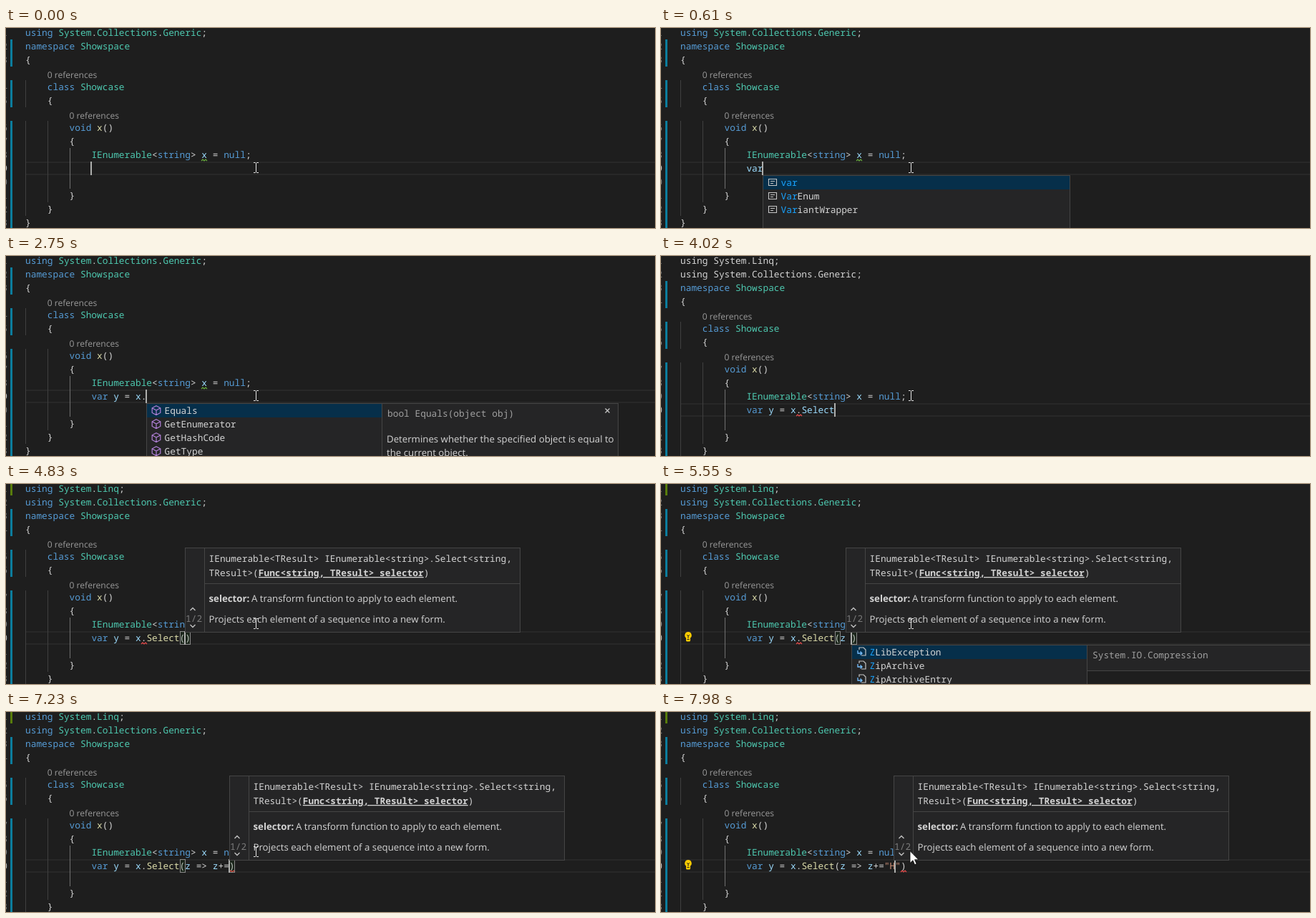
Recreate the animation shown at these times as an HTML page. Size 907 px wide and 280 px high, loop 8000 ms.

```html
<!DOCTYPE html>
<html lang="en">
<head>
<meta charset="utf-8">
<title>Code completion</title>
<style>
  html, body { margin: 0; width: 100%; height: 100%; overflow: hidden; background: #1e1e1e; }
  svg { display: block; width: 907px; height: 280px; }
  text { white-space: pre; text-rendering: geometricPrecision; fill: #d4d4d4; }
  .m { font: 12.83px "Noto Sans Mono", "DejaVu Sans Mono", monospace; }
  .s { font: 13.26px "Open Sans", "Noto Sans", sans-serif; }
  .b { font-weight: 700; }
  .lens { font-size: 12.07px; fill: #999; }
  .dim { fill: #a0a0a0; }
  .num { fill: #858585; text-anchor: end; }
  .num.on { fill: #c6c6c6; }
  .kw { fill: #569cd6; }
  .ty { fill: #4ec9b0; }
  .va { fill: #9cdcfe; }
  .fn { fill: #dcdcaa; }
  .st { fill: #ce9178; }
  .hit { fill: #18a3ff; }
  .u { text-decoration: underline; }
  .box { fill: #252526; stroke: #454545; }
  .pair { fill: #0064001a; stroke: #888; }
  .ln { fill: none; }
</style>
</head>
<body>
<svg id="stage" viewBox="0 0 907 280"></svg>
<script>
const LOOP = 8000, CH = 7.698, ROW = 19, LEFT = 27;
const KEYWORDS = /^(using|namespace|class|void|string|null|var)$/;
const TYPES = /^(System|Collections|Generic|Linq|Showspace|Showcase|IEnumerable)$/;

// Each entry: indent in columns, then text; "#" marks a reference count
const HEAD = [
  [0, 'using System.Collections.Generic;'], [0, 'namespace Showspace'], [0, '{'],
  [4, '#'], [4, 'class Showcase'], [4, '{'],
  [8, '#'], [8, 'void x()'], [8, '{'],
  [12, 'IEnumerable<string> x = null;']
];
const FOOT = [[0, ''], [8, '}'], [4, '}'], [0, '}']];

const LISTS = {
  v: { rows: ['var', 'virtual', 'void', 'volatile'], hit: 1, icon: 'key' },
  va: { rows: ['var', 'ValueTask', 'ValueTuple', 'ValueType'], hit: 2, icon: 'key' },
  var: { rows: ['var', 'VarEnum', 'VariantWrapper'], hit: 3, icon: 'key' },
  x: { rows: ['x', 'XAttribute', 'XCData', 'XComment'], hit: 1, icon: 'ref', type: '(local variable) IEnumerable<string> x' },
  dot: {
    rows: ['Equals', 'GetEnumerator', 'GetHashCode', 'GetType'], hit: 0, icon: 'cube',
    type: 'bool Equals(object obj)',
    docs: ['Determines whether the specified object is equal to', 'the current object.']
  },
  s: { rows: ['Select', 'SelectMany', 'SequenceEqual', 'Single'], hit: 1, icon: 'cube', type: 'System.Linq' },
  se: { rows: ['Select', 'SelectMany', 'SequenceEqual'], hit: 2, icon: 'cube', type: 'System.Linq' },
  z: { rows: ['ZLibException', 'ZipArchive', 'ZipArchiveEntry'], hit: 1, icon: 'ref', type: 'System.IO.Compression' }
};

const CALL = 'var y = x.Select(';
const START = { code: '', tail: '', caret: 1, bulb: 0, list: '', at: 0, sig: 0, added: 0, plain: 0, bar: 0, warn: 1, dotErr: 0, endErr: 0, arrow: 0 };
const STEPS = [
  [260, { code: 'v' }], [300, { list: 'v', at: 1 }],
  [400, { code: 'va' }], [430, { list: 'va', at: 2 }],
  [530, { code: 'var' }], [560, { list: 'var', at: 3 }],
  [670, { code: 'var ' }], [690, { list: '' }],
  [1180, { caret: 0 }], [1220, { caret: 1, code: 'var y' }], [1430, { bulb: 1 }],
  [1630, { code: 'var y ' }], [1750, { code: 'var y =' }], [1870, { code: 'var y = ' }],
  [2100, { bulb: 0 }],
  [2380, { code: 'var y = x' }], [2440, { list: 'x', at: 9 }],
  [2730, { code: 'var y = x.' }], [2750, { list: 'dot', at: 10 }], [2960, { bulb: 1 }],
  [3220, { caret: 0 }],
  [3490, { caret: 1, code: 'var y = x.S' }], [3510, { list: 's', at: 11 }],
  [3590, { code: 'var y = x.Se' }], [3610, { list: 'se', at: 12 }],
  [3630, { warn: 0, dotErr: 1 }], [3840, { bulb: 0 }],
  [4020, { code: 'var y = x.Select', list: '', added: 1, plain: 1 }], [4040, { plain: 0 }], [4220, { bar: 1 }],
  [4500, { code: CALL, tail: ')' }], [4600, { sig: 17 }],
  [5110, { code: CALL + 'z' }], [5130, { sig: 18 }], [5180, { list: 'z', at: 18 }],
  [5480, { bulb: 1 }], [5550, { code: CALL + 'z ', at: 19 }], [5570, { sig: 19, list: '' }],
  [5800, { code: CALL + 'z =' }], [5820, { sig: 20 }], [6050, { bulb: 0 }],
  [6170, { code: CALL + 'z =>' }], [6190, { sig: 21 }],
  [6400, { code: CALL + 'z => ' }], [6440, { sig: 22 }],
  [6720, { code: CALL + 'z => z' }], [6740, { sig: 23 }],
  [6790, { code: CALL + 'z => z+' }], [6830, { sig: 24, dotErr: 0, endErr: 1 }],
  [7130, { code: CALL + 'z => z+=' }], [7160, { sig: 25 }],
  [7590, { code: CALL + 'z => z+="', tail: '")' }], [7630, { sig: 26 }],
  [7860, { bulb: 1 }], [7960, { code: CALL + 'z => z+="H' }], [7980, { sig: 26.72, arrow: 1 }]
];

const esc = s => s.replace(/&/g, '&amp;').replace(/</g, '&lt;');
const colX = c => LEFT + c * CH;
const codeX = c => colX(12 + c);
const text = (x, y, cls, body) => `<text x="${x}" y="${y}" class="${cls}">${body}</text>`;
const rect = (x, y, w, h, attr) => `<rect x="${x}" y="${y}" width="${w}" height="${h}" ${attr}/>`;
const box = (x, y, w, h, cls = 'box') => rect(x + .5, y + .5, w - 1, h - 1, `class="${cls}"`);
const line = (d, color, w = 1) => `<path class="ln" d="${d}" stroke="${color}" stroke-width="${w}"/>`;

function paint(src) {
  return src.replace(/"[^"]*"?|\w+|[^\w"]+/g, (tok, i) => {
    let cls = '';
    if (tok[0] === '"') cls = 'st';
    else if (/\w/.test(tok)) {
      if (tok === 'var') cls = src.includes('=') ? 'kw' : 'va';
      else if (KEYWORDS.test(tok)) cls = 'kw';
      else if (TYPES.test(tok)) cls = 'ty';
      else cls = src[i + tok.length] === '(' ? 'fn' : 'va';
    }
    return `<tspan class="${cls}">${esc(tok)}</tspan>`;
  });
}

function squiggle(x, top, color) {
  return line(`M${x} ${top + 18}` + 'l2 -2l2 2'.repeat(2), color, 1.1);
}

function guide(col, from, to, color = '#404040') {
  return rect(Math.round(colX(col)), from, 1, to - from, `fill="${color}"`);
}

function bulb(top) {
  return `<g transform="translate(33 ${top + 1})">
    <path d="M5 0a4.8 4.8 0 0 1 3 8.5V12.500l-1 1H3l-1-1V8.500A4.800 4.800 0 0 1 5 0Z" fill="#fc0"/>
    <path d="M3.200 4l1.800 2 1.800-2M5 6v3M3.300 10.500h3.400" class="ln" stroke="#1e1e1e"/></g>`;
}

const ICONS = {
  cube: line('M7 .8L12.800 3.800V10.500L7 13.600 1.200 10.500V3.800ZM1.200 3.800L7 7l5.800-3.200M7 7v6.600', '#b180d7', 1.2),
  ref: line('M4 4V1h6l3 3v8H7', '#c5c5c5', 1.2) + line('M2 5v4h6M5.500 6.500L8 9 5.500 11.500', '#75beff', 1.3),
  key: line('M1.500 2.500h11v9h-11zM4 5.500h6M4 8.500h4', '#c5c5c5', 1.1)
};

function suggest(name, col, top) {
  const { rows, hit, icon, type, docs } = LISTS[name];
  const x = Math.round(codeX(col)), w = type ? 330 : 430;
  let out = box(x, top, w, 90) + rect(x + 1, top + 1, w - 2, ROW, 'fill="#062f4a"');
  rows.forEach((r, i) => {
    const y = top + 1 + i * ROW;
    out += `<g transform="translate(${x + 7} ${y + 2})">${ICONS[icon]}</g>`;
    out += text(x + 25.5, y + 14, 'm', `<tspan class="hit">${r.slice(0, hit)}</tspan>${r.slice(hit)}`);
  });
  if (!type) return out;
  const dx = x + w;
  out += box(dx - 1, top, 331, docs ? 90 : 37) + text(dx + 7, top + 19, 'm dim', esc(type));
  out += line(`M${dx + 311.500} ${top + 7.500}l6 6m0 -6l-6 6`, '#c5c5c5', 1.3);
  (docs || []).forEach((d, i) => out += text(dx + 6, top + 55 + i * ROW, 's', d));
  return out;
}

function signature(col) {
  const x = Math.round(codeX(col)), tx = x + 33.5;
  return box(x, 89, 469, 119) +
    rect(x + 27, 90, 1, 117, 'fill="#454545"') + rect(x + 28, 139, 440, 1, 'fill="#454545"') +
    line(`M${x + 7.500} 177l3.500 -3.500 3.500 3.500M${x + 7.500} 197l3.500 3.500 3.500 -3.500`, '#c5c5c5', 1.3) +
    text(x + 1, 193, 'm" style="fill:#7c7c7c', '1/2') +
    text(tx, 109, 'm', esc('IEnumerable<TResult> IEnumerable<string>.Select<string,')) +
    text(tx, 129, 'm', `TResult>(<tspan class="b u">${esc('Func<string, TResult> selector')}</tspan>)`) +
    text(tx, 165, 's b', 'selector:') +
    text(tx + 59.5, 165, 's', 'A transform function to apply to each element.') +
    text(tx, 194, 's', 'Projects each element of a sequence into a new form.');
}

function pointer(arrow) {
  if (arrow) return '<path d="M348 194.500v17l4-3.700 2.600 6 2.600-1.200-2.600-5.800h5.400Z" fill="#fff" stroke="#000" stroke-width=".8"/>';
  return line('M346 188.500h2.500l1 1 1 -1h2.500M349.500 189v13M346 202.500h2.500l1 -1 1 1h2.500', '#e8e8e8');
}

function draw(s) {
  const dy = s.added * ROW, cur = 187 + dy, below = cur + ROW;
  const src = s.code + s.tail;
  const rows = [...HEAD, [12, src], ...FOOT];
  if (s.added) rows.unshift([0, 'using System.Linq;']);

  let out = rect(LEFT, cur, 880, 2, 'fill="#282828"') + rect(LEFT, cur + 17, 880, 2, 'fill="#282828"');
  out += guide(0, 73 + dy, 111 + dy) + guide(0, 130 + dy, 263 + dy);
  out += guide(4, 130 + dy, 244 + dy) + guide(8, 168 + dy, 225 + dy, '#707070');
  for (const [from, to] of [[16, 54], [73, 111], [130, 280]])
    out += rect(6, from + dy, 3, to - from, 'fill="#0c7d9d"');
  if (s.bar) out += rect(6, -3, 3, ROW, 'fill="#587c0c"');

  let n = 0;
  rows.forEach(([col, str], i) => {
    const top = -3 + i * ROW, x = colX(col);
    if (str === '#') {
      out += text(x, top + 16, 's lens', '0 references');
      return;
    }
    out += text(2, top + 14, 'm num' + (top === cur ? ' on' : ''), ++n);
    out += text(x, top + 14, 'm', s.plain && str.startsWith('using') ? str : paint(str));
  });

  if (s.warn) out += squiggle(273, 168 + dy, '#6cb33f');
  if (s.dotErr) out += squiggle(189, cur, '#f14c4c');
  if (s.endErr) out += squiggle(Math.round(codeX(src.length - 1)), cur, '#f14c4c');
  if (s.tail === ')')
    for (const c of [16, s.code.length]) out += box(Math.round(codeX(c)), cur, 8, ROW, 'pair');
  if (s.bulb) out += bulb(cur);
  if (s.caret) out += rect(Math.round(codeX(s.code.length)) - 1, cur, 2, ROW, 'fill="#aeafad"');
  if (s.list) out += suggest(s.list, s.at, below);
  if (s.sig) out += signature(s.sig);
  return out + pointer(s.arrow);
}

const stage = document.getElementById('stage');
const begin = performance.now();
let shown = -1;

function tick() {
  const t = Math.max(0, performance.now() - begin) % LOOP;
  const past = STEPS.filter(step => step[0] <= t);
  if (past.length !== shown) {
    shown = past.length;
    stage.innerHTML = draw(Object.assign({}, START, ...past.map(step => step[1])));
  }
  requestAnimationFrame(tick);
}
tick();
</script>
</body>
</html>
```
